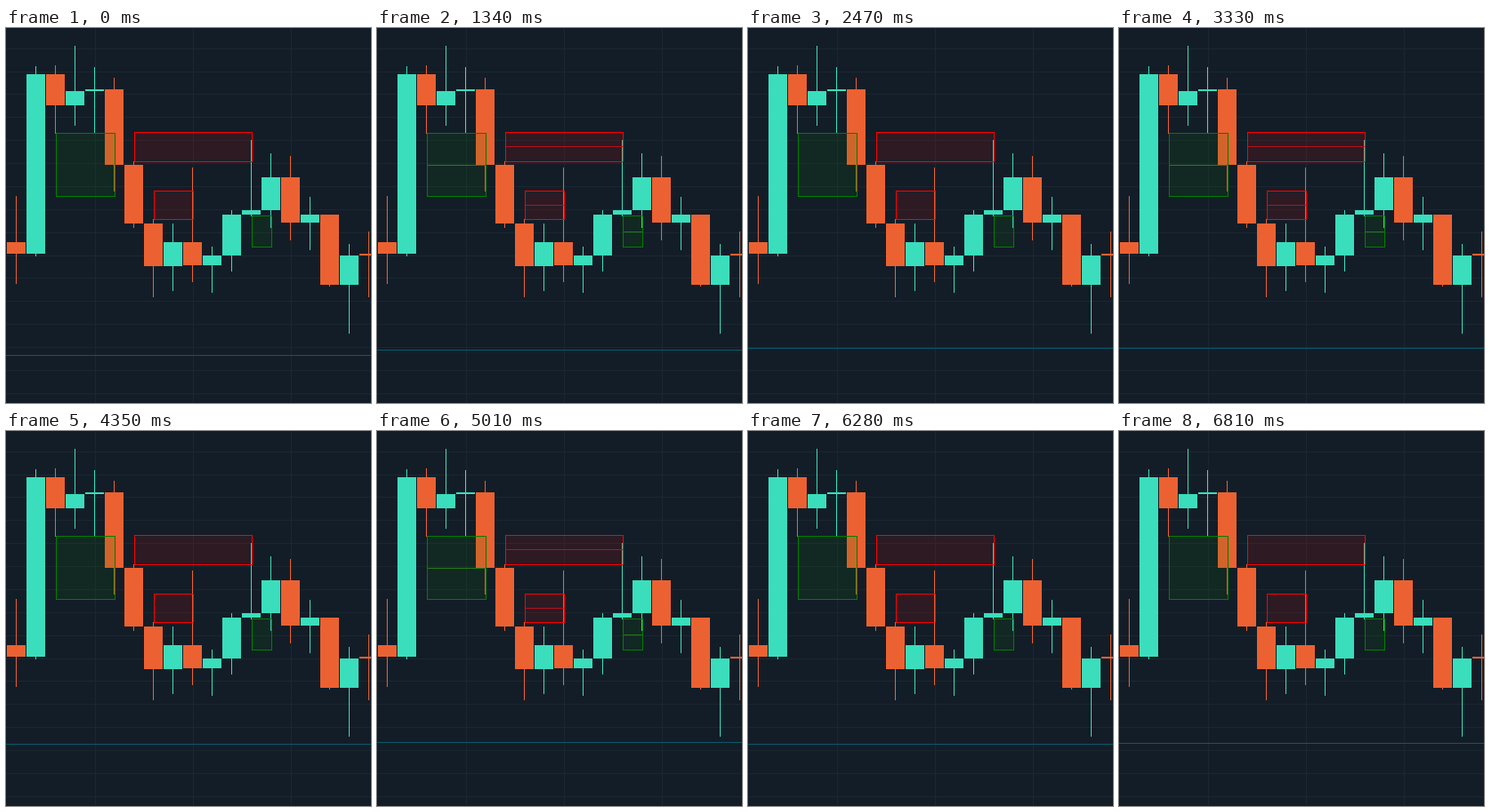
These frames come from a looping animation (410 px wide and 422 px high, 7080 ms). An HTML page with a canvas:

```html
<!DOCTYPE html>
<html lang="en">
<head>
<meta charset="utf-8">
<title>Candlestick chart</title>
<style>
  html, body { margin: 0; width: 100%; height: 100%; overflow: hidden; background: #131d27; }
  canvas { display: block; }
</style>
</head>
<body>
<canvas id="chart" width="410" height="422"></canvas>
<script>
const ctx = document.getElementById('chart').getContext('2d');
const WIDTH = 410, HEIGHT = 422, LOOP = 7080;
const STEP = 22, BODY = 21, FIRST_OPEN = 241;
const UP = '#3adebc', DOWN = '#ec6131', GRID = '#1b2730';

// Each candle opens where the previous one closed: "close high low"
const candles = `254 189 288, 52 43 257, 87 42 119, 71 20 110, 69 44 118, 154 56 184,
  220 150 225, 268 215 303, 241 220 296, 267 157 286, 256 246 298, 210 205 274, 205 126 212,
  168 141 225, 219 144 239, 210 190 250, 289 210 291, 256 243 344, 254 229 303`
  .split(',').map(candle => candle.trim().split(' ').map(Number));

const GREEN = { edge: '#008000', fill: 'rgba(0,128,0,.12)', midColor: '#287a1a' };
const RED = { edge: '#ff0000', fill: 'rgba(255,0,0,.11)', midColor: '#b0141d' };
const zones = [
  { x: 56, y: 118, w: 67, h: 72, mid: 154, ...GREEN },
  { x: 144, y: 117, w: 133, h: 34, mid: 133, ...RED },
  { x: 166, y: 183, w: 45, h: 33, mid: 199, ...RED },
  { x: 276, y: 211, w: 23, h: 36, mid: 229, ...GREEN }
];

// The price jumps to each level and holds it: [time, y]
const prices = [
  [0, 368], [250, 365], [320, 362], [1130, 365], [1340, 362], [1470, 359],
  [1670, 357], [2010, 360], [3000, 358], [3130, 356], [3330, 360], [4020, 356],
  [4350, 352], [4610, 348], [4810, 351], [5010, 350], [5220, 347], [5410, 350],
  [5610, 347], [5950, 352], [6540, 351]
];
const midlineSpans = [[1270, 1940], [2740, 3750], [4880, 5740]];

function rect(color, x, y, w, h) {
  ctx.fillStyle = color;
  ctx.fillRect(x, y, w, h);
}

function drawGrid() {
  for (let y = 23.2; y < HEIGHT; y += 25.87) rect(GRID, 0, Math.floor(y), WIDTH, 1);
  for (let x = 100; x < WIDTH; x += 110) rect(GRID, x, 0, 1, HEIGHT);
}

function drawCandles() {
  let open = FIRST_OPEN;
  candles.forEach(([close, high, low], i) => {
    const x = 1 + i * STEP;
    const last = i === candles.length - 1;
    const color = close < open && !last ? UP : DOWN;
    rect(color, x + 10, high, 1, low - high);
    rect(color, x, Math.min(open, close), BODY, Math.abs(close - open));
    open = close;
  });
}

function drawZone(zone, showMidline) {
  const { x, y, w, h } = zone;
  rect(zone.fill, x, y, w, h);
  if (showMidline) rect(zone.midColor, x + 1, zone.mid, w - 2, 1);
  ctx.strokeStyle = zone.edge;
  ctx.strokeRect(x + .5, y + .5, w - 1, h - 1);
}

function draw(t) {
  rect('#131d27', 0, 0, WIDTH, HEIGHT);
  drawGrid();
  const price = prices.findLast(([start]) => start <= t)[1];
  rect('#085a6c', 0, price, WIDTH, 1);
  drawCandles();
  const showMidlines = midlineSpans.some(([from, to]) => t >= from && t < to);
  zones.forEach(zone => drawZone(zone, showMidlines));
}

function tick() {
  draw(performance.now() % LOOP);
  requestAnimationFrame(tick);
}
tick();
</script>
</body>
</html>
```
